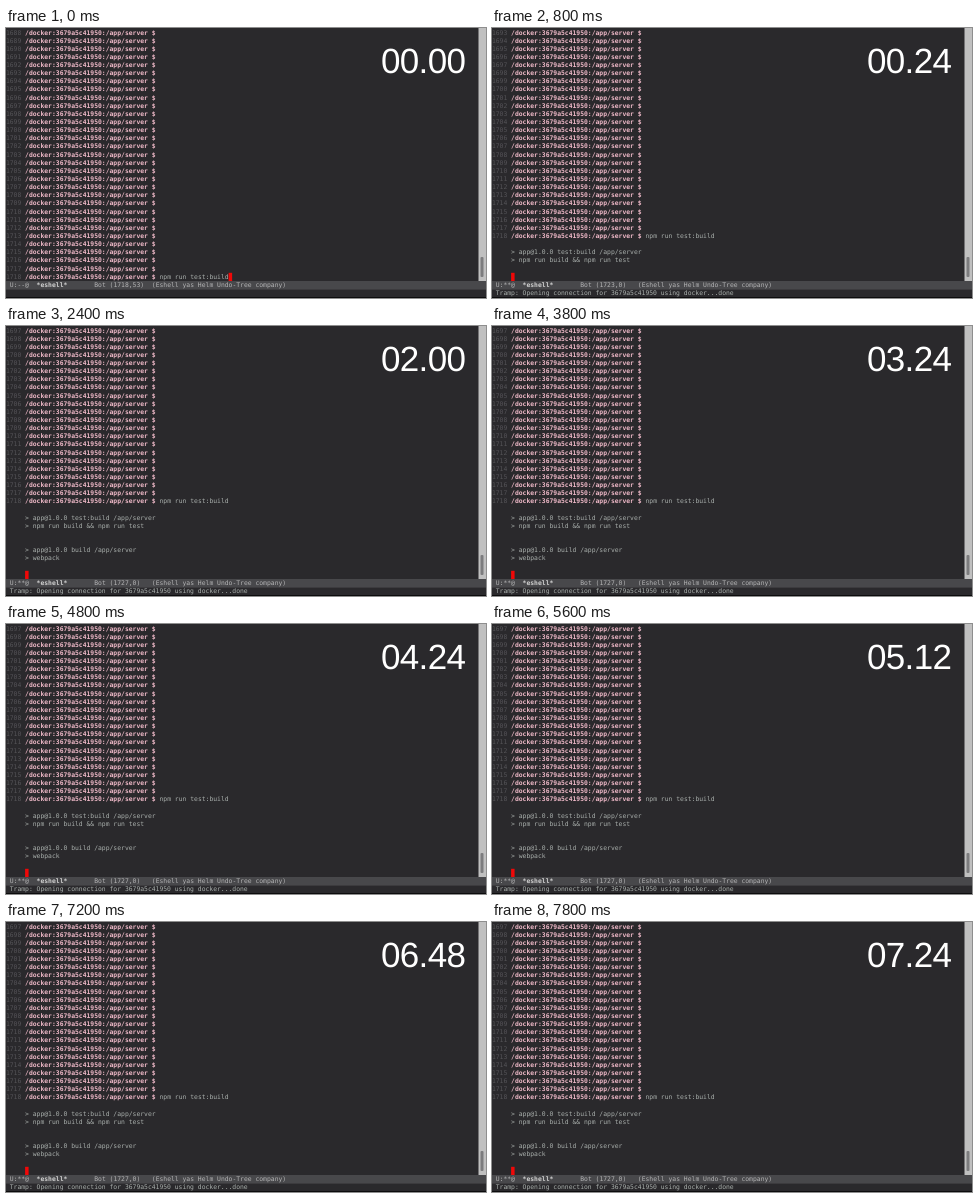
An HTML page for the animation above (8000 ms loop, 480 px wide and 270 px high).

```html
<!DOCTYPE html>
<html lang="en">
<head>
<meta charset="utf-8">
<title>Terminal build timer</title>
<style>
  html, body { margin: 0; width: 100%; height: 100%; overflow: hidden; background: #2a292c; }
  svg { display: block; width: 100vw; height: 100vh; }
  text { white-space: pre; text-rendering: geometricPrecision; }
  #term text { font: 6.38px "DejaVu Sans Mono", monospace; fill: #a9afac; }
  #term .num { fill: #555458; }
  #term .prompt { fill: #efb9c8; font-weight: bold; }
  #term .mode { fill: #b4b4b5; }
  #term .bold { fill: #d0d0d0; font-weight: bold; }
  #clock { font: 35px "Liberation Sans", Arial, sans-serif; letter-spacing: -0.6px; fill: #fff; }
</style>
</head>
<body>
<svg viewBox="0 0 480 270">
  <rect width="480" height="270" fill="#2a292c"/>
  <rect x="472.5" width="7.5" height="253" fill="#c0c0c0"/>
  <rect x="474.5" y="229" width="3" height="20" rx="1" fill="#7c7c7e"/>
  <rect y="253" width="480" height="8.6" fill="#48484b"/>
  <rect y="269" width="480" height="1" fill="#0c0c0d"/>
  <g id="term"></g>
  <text id="clock" x="374.9" y="45"></text>
</svg>
<script>
const LOOP = 8000, STEP = 200, ENTER = 400;
const CHAR = 3.84, LEFT = -0.1, ROW = 8.14, LAST_ROW = 30, COMMAND_LINE = 1718;
const MODE_Y = 259.2, ECHO_Y = 267.2;
const PROMPT = '/docker:3679a5c41950:/app/server $';
const ECHO = 'Tramp: Opening connection for 3679a5c41950 using docker...done';
const OUTPUT = {
  1720: '> app@1.0.0 test:build /app/server',
  1721: '> npm run build && npm run test',
  1724: '> app@1.0.0 build /app/server',
  1725: '> webpack'
};
// Cursor position from each moment on
const STATES = [
  { at: 0, line: 1718, col: 53 },
  { at: ENTER, line: 1719, col: 0 },
  { at: 800, line: 1723, col: 0 },
  { at: 1200, line: 1727, col: 0 }
];

const term = document.getElementById('term');
const clock = document.getElementById('clock');
let shown = null;

const colX = col => (LEFT + col * CHAR).toFixed(2);
const escape = s => s.replace(/&/g, '&amp;').replace(/>/g, '&gt;');
const label = (col, y, s, cls = '') =>
  `<text class="${cls}" x="${colX(col)}" y="${y.toFixed(2)}">${escape(s)}</text>`;

function drawTerminal({ at, line, col }) {
  const started = at >= ENTER;
  let out = '';
  for (let row = 0; row <= LAST_ROW; row++) {
    const n = line - LAST_ROW + row, y = 6.5 + row * ROW;
    if (n <= COMMAND_LINE) {
      out += label(0, y, String(n), 'num') + label(5, y, PROMPT, 'prompt');
      if (n === COMMAND_LINE) out += label(40, y, 'npm run test:build');
    } else if (n < line && OUTPUT[n]) {
      out += label(5, y, OUTPUT[n]);
    }
  }
  out += `<rect x="${colX(col + 5)}" y="244.8" width="3.5" height="8.2" fill="#f00808"/>`
    + label(1, MODE_Y, started ? 'U:**@' : 'U:--@', 'mode')
    + label(8, MODE_Y, '*eshell*', 'bold')
    + label(23, MODE_Y, `Bot (${line},${col})`, 'mode')
    + label(38, MODE_Y, '(Eshell yas Helm Undo-Tree company)', 'mode');
  if (started) out += label(1, ECHO_Y, ECHO);
  term.innerHTML = out;
}

const pad = n => String(n).padStart(2, '0');

function render(ms) {
  const t = Math.floor(ms / STEP) * STEP;
  const state = STATES.filter(s => s.at <= t).pop();
  if (state !== shown) drawTerminal(shown = state);
  // Seconds and sixtieths since the command started
  const ticks = Math.round(Math.max(0, t - ENTER) * 60 / 1000);
  clock.textContent = `${pad(Math.floor(ticks / 60))}.${pad(ticks % 60)}`;
}

const start = performance.now();
function loop() {
  render((performance.now() - start) % LOOP);
  requestAnimationFrame(loop);
}
loop();
</script>
</body>
</html>
```
